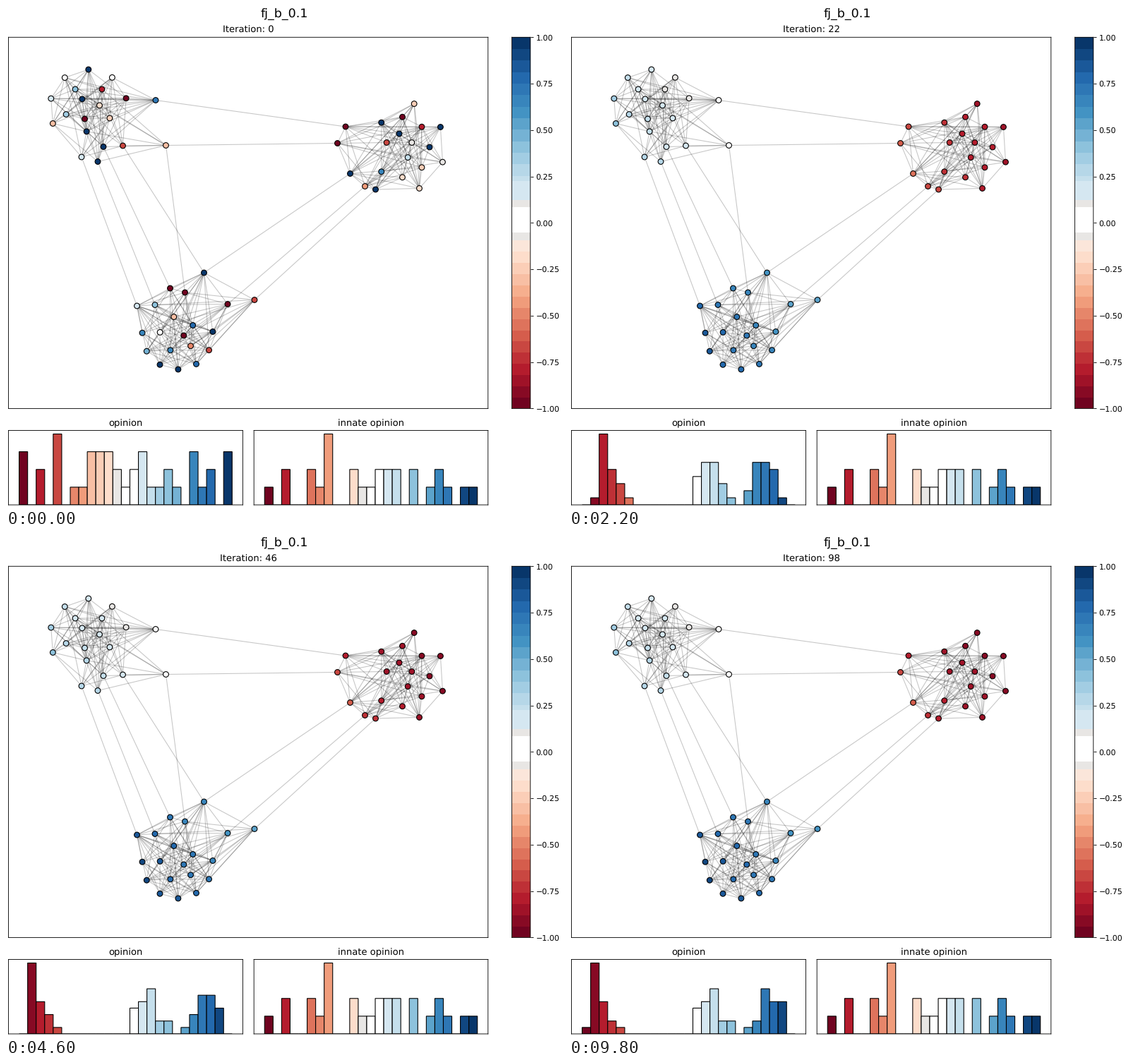
A matplotlib script for the animation above (10000 ms loop, 789 px wide and 710 px high).

```python
import numpy as np
import matplotlib.pyplot as plt
from matplotlib.animation import FuncAnimation
from matplotlib.collections import LineCollection
from matplotlib.colors import BoundaryNorm, ListedColormap

plt.rcParams.update({"text.hinting": "none", "path.snap": False})

W, H, DPI = 789, 710, 78.9
FRAMES, INTERVAL = 50, 200
SIZE = 20                     # nodes per community
BINS = np.linspace(-1, 1, 26)
STEP = BINS[1] - BINS[0]

# Links between communities; their ends are the outlying nodes.
BRIDGES = [((212, 133.5), (481, 171)), ((226.5, 197.5), (469.5, 194.5)),
           ((107, 214), (185.5, 425)), ((130, 220.5), (211, 423.5)),
           ((138, 199.5), (232.5, 400)), ((165.5, 198), (280.5, 378)),
           ((226.5, 197.5), (253.5, 406)), ((280.5, 378), (487.5, 237.5)),
           ((314, 422.5), (508.5, 255.5)), ((352, 416.5), (523.5, 260))]

# Other nodes sit on arcs: count, radius, first angle, angle step.
CENTERS = np.array([(117, 145), (557, 200), (243, 465)])
ARCS = [[(6, 55, 157, 37.6), (5, 33, 25, 70), (3, 16, 345, 125)],
        [(4, 65, 289, 45), (7, 43, 234, 42), (4, 19, 200, 70)],
        [(7, 50, 356, 31), (5, 25, 330, 72), (1, 9, 13, 0)]]

# Opinions by rank inside a community: early (iteration 6) and settled.
RANKS = [0, 2, 12, 17, 19]
EARLY = [(0.05, 0.075, 0.18, 0.272, 0.38),
         (-0.58, -0.515, -0.438, -0.37, -0.3),
         (0.35, 0.372, 0.537, 0.597, 0.65)]
SETTLED = [(0.05, 0.1, 0.245, 0.3, 0.43),
           (-0.925, -0.905, -0.838, -0.745, -0.635),
           (0.57, 0.673, 0.79, 0.875, 0.905)]

# Bar heights; START also counts the nodes below and above the range.
INNATE = [1, 0, 2, 0, 0, 2, 1, 4, 0, 0, 2, 1, 1,
          2, 2, 2, 0, 2, 0, 1, 2, 1, 0, 1, 1]
START = [6, 3, 0, 2, 0, 4, 0, 1, 1, 3, 3, 3, 2, 1,
         2, 3, 1, 1, 2, 1, 0, 3, 1, 2, 0, 3, 12]

rng = np.random.default_rng(4)


def community(k):
    """Node positions, ordered from lowest to highest opinion."""
    ends = dict.fromkeys(p for bridge in BRIDGES for p in bridge)
    pts = [p for p in ends
           if np.hypot(*(CENTERS - p).T).argmin() == k]
    for n, radius, first, step in ARCS[k]:
        a = np.radians(first + step * np.arange(n))
        pts += list(CENTERS[k] + radius * np.c_[np.cos(a), np.sin(a)])
    return np.array(sorted(pts, key=lambda p: p[1] / 2 - p[0]))


def inner_links(pts):
    """Random links, less likely over a long distance."""
    return [(pts[i], pts[j]) for i in range(len(pts)) for j in range(i)
            if rng.random() < 0.9 - np.hypot(*(pts[i] - pts[j])) / 300]


def by_rank(profiles):
    return np.hstack([np.interp(range(SIZE), RANKS, p) for p in profiles])


groups = [community(k) for k in range(3)]
nodes = np.vstack(groups)
links = BRIDGES + [link for g in groups for link in inner_links(g)]
start = rng.permutation(np.repeat(-1 + STEP * (np.arange(27) - 0.5), START))
early, settled = by_rank(EARLY), by_rank(SETTLED)


def opinions(t):
    """Averaging wipes out the start at once, then groups drift slowly."""
    trend = settled + (early - settled) * 0.91 ** (t - 6)
    return trend + (start - trend) * 0.25 ** t


# Banded red-blue scale with a white middle.
edges = np.r_[np.linspace(-1, -0.093, 16), -0.051, 0.085, 0.123, 0.226,
              np.linspace(0.256, 1, 13)]
mids = (edges[:-1] + edges[1:]) / 2
bands = plt.get_cmap("RdBu")((mids + 1) / 2)
bands[16] = 1
bands[[15, 17]] = (0.91, 0.902, 0.894, 1)
cmap = ListedColormap(bands)
norm = BoundaryNorm(edges, len(bands))


def shade(values):
    return cmap(norm(np.clip(values, -0.999, 0.999)))


fig = plt.figure(figsize=(W / DPI + 1e-6, H / DPI + 1e-6), dpi=DPI,
                 facecolor="white")


def panel(x0, y0, x1, y1):
    return fig.add_axes([x0 / W, 1 - y1 / H, (x1 - x0) / W, (y1 - y0) / H])


def histogram(x0, x1, title):
    ax = panel(x0, 601.5, x1, 707)
    ax.set(xlim=(-1.1, 1.1), xticks=[], yticks=[])
    ax.set_title(title, fontsize=12)
    centers = (BINS[:-1] + BINS[1:]) / 2
    bars = ax.bar(centers, np.zeros(25), STEP, color=shade(centers),
                  edgecolor="black", linewidth=1)
    return ax, bars


def set_counts(ax, bars, counts):
    for bar, n in zip(bars, counts):
        bar.set_height(n)
    ax.set_ylim(0, 1.05 * max(counts))


fig.text(0.5, 1 - 16 / H, "fj_b_0.1", fontsize=16, ha="center", va="baseline")

LEFT, TOP, RIGHT, BOTTOM = 3.5, 44.3, 682.8, 570.4
net = panel(LEFT, TOP, RIGHT, BOTTOM)
net.set(xlim=(LEFT, RIGHT), ylim=(BOTTOM, TOP), xticks=[], yticks=[])
title = net.set_title("", fontsize=12)
net.add_collection(LineCollection(links, colors="black", linewidths=1,
                                  alpha=0.22, zorder=1))
dots = net.scatter(*nodes.T, s=50, c=shade(start), edgecolors="black",
                   linewidths=1, zorder=2)

scale = panel(716.5, TOP, 742.8, BOTTOM)
scale.pcolormesh([0, 1], edges, mids[:, None], cmap=cmap, norm=norm)
scale.set(ylim=(-1, 1), xticks=[], yticks=np.linspace(-1, 1, 9))
scale.yaxis.tick_right()

now_ax, now_bars = histogram(LEFT, 335.4, "opinion")
set_counts(*histogram(351.2, RIGHT, "innate opinion"), INNATE)


def update(frame):
    t = 2 * frame
    values = opinions(t)
    title.set_text(f"Iteration: {t}")
    dots.set_facecolor(shade(values))
    set_counts(now_ax, now_bars, np.histogram(values, BINS)[0])
    return title, dots, *now_bars


anim = FuncAnimation(fig, update, frames=FRAMES, interval=INTERVAL,
                     init_func=lambda: update(0), repeat=True, repeat_delay=0)
plt.show()
```
